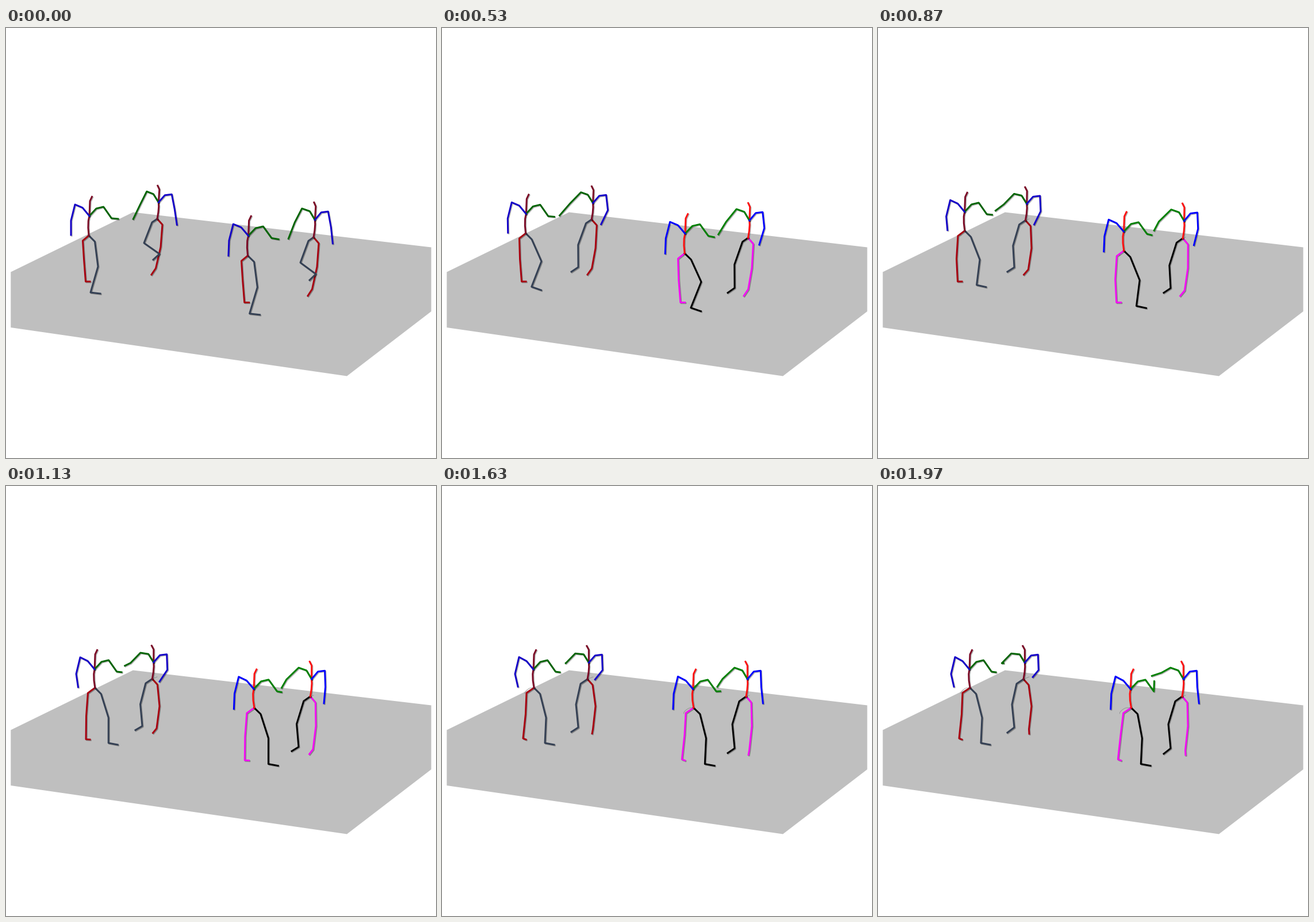
Recreate the animation shown at these times as a matplotlib script. Size 748 by 748 pixels, loop 2010 ms.

```python
import numpy as np
import matplotlib.pyplot as plt
import matplotlib.patheffects as pe
from matplotlib.animation import FuncAnimation

SIZE, DPI, FRAMES = 748, 100, 60
SWITCH = 10  # the right pair turns bright here

DARK = ("#a80010", "#344054", "#7c0a26", "#006400", "#1400c8")
BRIGHT = ("#f40cf4", "black", "#ff1010", "green", "blue")
CHAINS = (
    ("root", "hip_r", "knee_r", "ankle_r", "toe_r"),
    ("root", "hip_l", "knee_l", "ankle_l", "toe_l"),
    ("root", "low_back", "mid_back", "chest", "neck", "head"),
    ("chest", "collar_l", "shoulder_l", "elbow_l", "wrist_l"),
    ("chest", "collar_r", "shoulder_r", "elbow_r", "wrist_r"),
)
ON_ROOT = ("chest", "hip_r", "hip_l")
ON_FLOOR = ("root", "knee_r", "ankle_r", "toe_r", "knee_l", "ankle_l", "toe_l")


def ease(n, start, end):
    u = np.clip((n - start) / (end - start), 0, 1)
    return u * u * (3 - 2 * u)


def wave(n):
    """Repeated lift of the waving hand."""
    return np.sin(np.pi * (n - 32) / 18) ** 2 if n > 32 else 0


def place(n, start, *steps):
    """Start point plus steps: (dx, dy, begin, end) eases, (dx, dy) waves."""
    p = np.array(start, float)
    for dx, dy, *span in steps:
        p += np.array([dx, dy]) * (ease(n, *span) if span else wave(n))
    return p


# Leg joints stand on the floor; other joints are offsets from root or chest.
FRONT = dict(
    root=[(144, 361), (16, 0, 7, 49), (0, -10, 0, 35)],
    chest=[(1, -34), (-2, 2, 7, 40)],
    neck=[(1, -26)],
    head=[(4.5, -33.5)],
    collar_r=[(-12, -14.5)],
    shoulder_r=[(-25, -20), (0, -1.5, 10, 50)],
    elbow_r=[(-32, 8)],
    wrist_r=[(-32, 33), (5, -3, 7, 49)],
    collar_l=[(12, -13)],
    shoulder_l=[(24.5, -16)],
    elbow_l=[(38.5, 4)],
    wrist_l=[(50, 5), (-4, 0, 0, 49)],
    hip_r=[(-10.5, 9), (-2.5, 0, 0, 49)],
    knee_r=[(135.5, 402), (10, -5, 20, 50)],
    ankle_r=[(138.5, 441), (2.5, -2, 26, 50)],
    toe_r=[(146, 441)],
    hip_l=[(10.5, 10.5)],
    knee_l=[(160, 415), (17, -12, 0, 22), (4, 0, 26, 45)],
    ankle_l=[(147, 460), (32, 0, 4, 36), (0, -13, 0, 22)],
    toe_l=[(164, 462), (31, 0, 4, 36), (0, -12, 0, 30)],
)
BACK = dict(
    root=[(263, 332), (-10, 4, 0, 43)],
    chest=[(2.3, -28.7)],
    neck=[(1.5, -22.5), (-1.5, 0, 0, 40)],
    head=[(-1.5, -29), (-2, 0, 0, 40)],
    collar_r=[(11, -12.5)],
    shoulder_r=[(23, -14)],
    elbow_r=[(28, 12), (-4, 1, 0, 30)],
    wrist_r=[(32, 39), (-18, -2, 0, 16), (-5, -5, 20, 40), (5, -7, 40, 59)],
    collar_l=[(-9, -14.5)],
    shoulder_l=[(-20.5, -19), (-3, 3, 7, 45)],
    elbow_l=[(-32, 4), (-8, -3, 0, 14)],
    wrist_l=[(-44, 29), (-14, 0, 0, 8), (0, -28, 0, 45), (21, 0, 14, 59)],
    hip_r=[(9, 10)],
    knee_r=[(269, 381), (-2, 2, 0, 10)],
    ankle_r=[(260.5, 418), (2, 5, 10, 45)],
    toe_r=[(253, 429), (10, 2, 20, 59)],
    hip_l=[(-9, 6), (-3, 2, 0, 45)],
    knee_l=[(240, 374), (-3, 3, 0, 8), (-4, 3, 10, 40)],
    ankle_l=[(267, 393), (-30, 23, 0, 14), (0, 4, 20, 50)],
    toe_l=[(256, 403), (-31, 21, 0, 13), (0, 5, 26, 59)],
)
# The right pair repeats the left pair but drifts and waves.
FRONT_RIGHT = FRONT | dict(
    root=[*FRONT["root"], (3, 0, 45, 59)],
    wrist_r=[(-33, 34)],
    wrist_l=[(50, 6), (-4, 0, 0, 30), (-7, -20)],
)
BACK_RIGHT = BACK | dict(
    root=[*BACK["root"], (4, -2, 10, 45)],
    wrist_r=[(31, 39), (-14, 1, 0, 16), (10, 0, 27, 40)],
    shoulder_l=[(-22.5, -19)],
    elbow_l=[(-35, 4), (-9, -3, 0, 26), (6, -12)],
    wrist_l=[(-46, 31), (-10, 0, 0, 8), (4, -16, 0, 30), (-3, -21)],
)


class Dancer:
    def __init__(self, ax, rig, bend, shift=(0, 0), grow=(0, 0), bright=False):
        self.rig, self.bend, self.bright = rig, bend, bright
        self.shift, self.grow = np.array(shift), np.array(grow)
        self.origin = np.array(rig["root"][0])
        self.path = np.array([self.joints(n)["root"] for n in range(FRAMES)])
        shadow = [pe.SimpleLineShadow(offset=(0.9, -0.9), shadow_color="k", alpha=0.3),
                  pe.Normal()]
        self.trail, = ax.plot([], [], color="#808080", lw=0.6, alpha=0.8, zorder=2)
        self.lines = [ax.plot([], [], lw=2.1, zorder=3, path_effects=shadow)[0]
                      for _ in CHAINS]

    def joints(self, n):
        j = {name: place(n, *moves) for name, moves in self.rig.items()}
        for name in ON_ROOT:
            j[name] += j["root"]
        for name in j:
            if name not in ON_ROOT + ON_FLOOR:
                j[name] += j["chest"]
        for name, f in (("low_back", 0.4), ("mid_back", 0.75)):
            j[name] = j["root"] + (j["chest"] - j["root"]) * f + (self.bend, 0)
        return {k: p + self.shift + self.grow * (p - self.origin)
                for k, p in j.items()}

    def draw(self, n):
        j = self.joints(n)
        colors = BRIGHT if self.bright and n >= SWITCH else DARK
        for line, chain, color in zip(self.lines, CHAINS, colors):
            line.set_data(*np.array([j[name] for name in chain]).T)
            line.set_color(color)
        self.trail.set_data(*self.path[:n + 1].T)
        return [self.trail, *self.lines]


fig = plt.figure(figsize=(SIZE / DPI, SIZE / DPI), dpi=DPI, facecolor="white")
ax = fig.add_axes([0, 0, 1, 1])
ax.set(xlim=(0, SIZE), ylim=(SIZE, 0))
ax.axis("off")
ax.fill([8.3, 221, 739.7, 739.7, 593, 8.3], [424.5, 320.5, 381.5, 493, 605.5, 521],
        color="#bfbfbf", lw=0, zorder=1)

dancers = [
    Dancer(ax, BACK, 1),
    Dancer(ax, FRONT, -1.5),
    Dancer(ax, BACK_RIGHT, 1, (272, 32), (0, 0.05), bright=True),
    Dancer(ax, FRONT_RIGHT, -1.5, (276.5, 35), (0.05, 0.018), bright=True),
]


def draw(n):
    return [artist for d in dancers for artist in d.draw(n)]


anim = FuncAnimation(fig, draw, frames=FRAMES, interval=33.5, repeat=True,
                     repeat_delay=0, blit=False)
plt.show()
```
